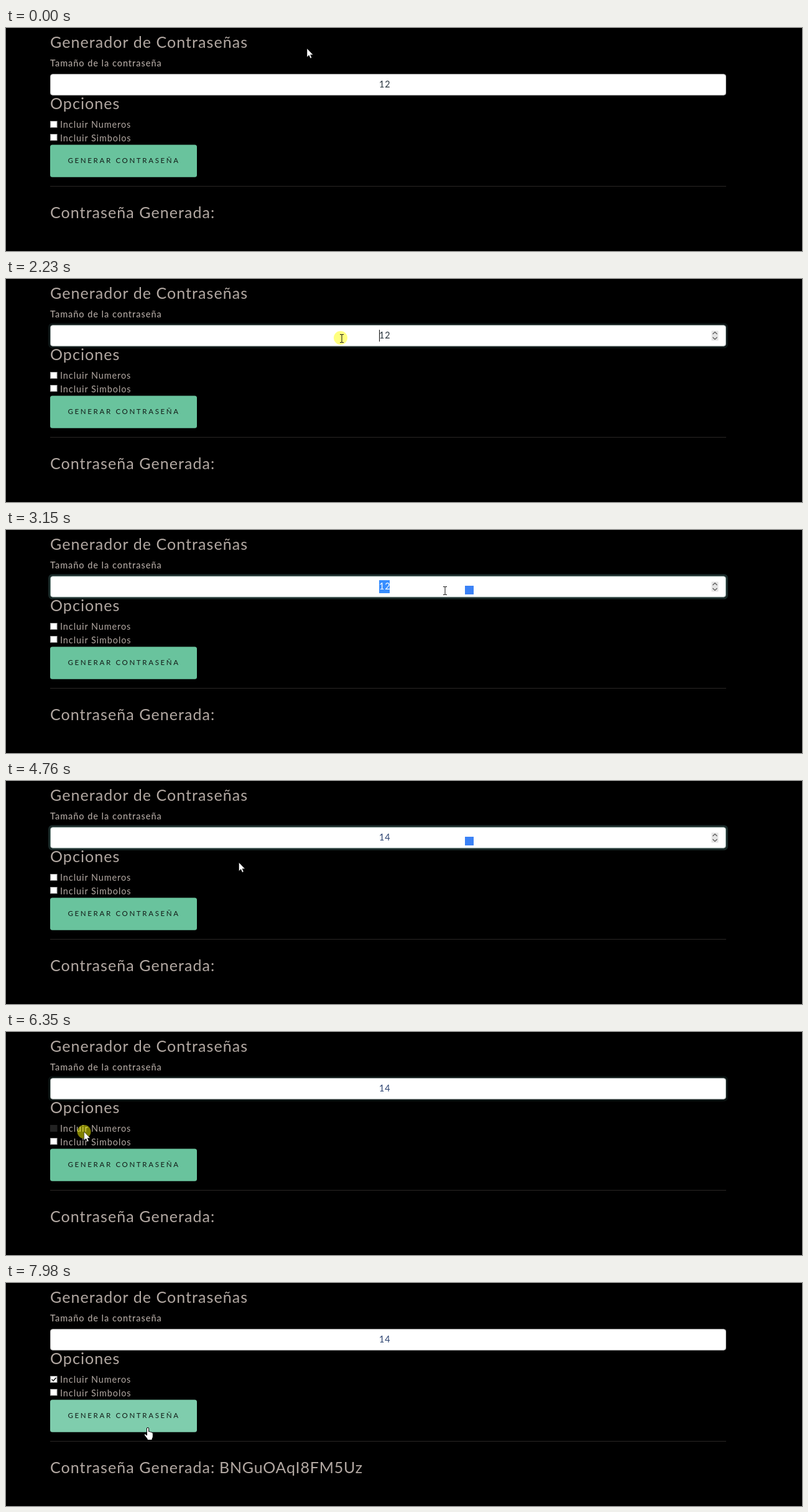
These frames come from a looping animation (1280 by 360 pixels, 8000 ms). An HTML page:

```html
<!DOCTYPE html>
<html lang="es">
<head>
<meta charset="utf-8">
<title>Generador de Contraseñas</title>
<style>
  html, body { margin: 0; width: 100%; height: 100%; overflow: hidden; background: #000; }
  svg { display: block; }
  text { font: 14.4px Lato, "Open Sans", sans-serif; letter-spacing: .95px; fill: #b2a8a2; white-space: pre; }
  .head { font-size: 25px; letter-spacing: 1.07px; }
  .label { font-weight: 500; letter-spacing: 1.02px; }
  .btn { font-size: 11.5px; letter-spacing: 2.66px; fill: #111a16; }
  .box { fill: #fff; stroke: #a0a0a0; }
</style>
</head>
<body>
<svg width="1280" height="360" viewBox="0 0 1280 360">
  <text class="head" x="71" y="32">Generador de Contraseñas</text>
  <text class="label" x="71" y="62">Tamaño de la contraseña</text>

  <rect id="ring" x="69.5" y="72.7" width="1090" height="37.6" rx="5" fill="none" stroke="#1a2a29" stroke-width="3"/>
  <rect id="field" x="71.5" y="74.7" width="1086" height="33.6" rx="3.5" fill="#fff"/>
  <rect id="selection" y="81" x="600" height="21" fill="#388eff"/>
  <text id="value" y="96"></text>
  <rect id="caret" y="82" width="1" height="19" fill="#111"/>
  <g id="spinner" fill="none" stroke="#555" stroke-width="1.2">
    <rect x="1134.5" y="83.5" width="11" height="16" fill="#e4e4e4" stroke="none"/>
    <path d="M1136.5 89l3.5-3.5 3.5 3.5M1136.5 94l3.5 3.5 3.5-3.5"/>
  </g>
  <rect id="badge" x="738" y="90" width="14" height="14" fill="#3b82f6"/>

  <text class="head" x="71" y="131">Opciones</text>
  <rect id="box" class="box" x="71.5" y="150.5" width="10.5" height="10"/>
  <path id="tick" d="M73.5 155.5l2.5 2.5 4.5-5" fill="none" stroke="#111" stroke-width="1.5"/>
  <text x="87" y="161">Incluir Numeros</text>
  <rect class="box" x="71.5" y="171.5" width="10.5" height="10"/>
  <text x="87" y="182.5">Incluir Simbolos</text>

  <rect id="button" x="71" y="188.5" width="236" height="52.3" rx="3.6"/>
  <text class="btn" x="99.5" y="218">GENERAR CONTRASEÑA</text>
  <rect x="71" y="255" width="1087" height="1" fill="#2a2725"/>
  <text class="head" x="71" y="307">Contraseña Generada:</text>
  <text id="password" class="head" x="343" y="307" style="letter-spacing:.8px">BNGuOAqI8FM5Uz</text>

  <g id="pointer">
    <circle id="halo" r="11" fill="#ff0" fill-opacity=".5"/>
    <path id="arrow" d="M0 0V14L3.2 11 5.4 16 7.6 15 5.5 10.2H9.8Z" fill="#fff" stroke="#000" stroke-width=".5"/>
    <path id="beam" d="M-1-5.5H1.2Q2-5.5 2-4.5Q2-5.5 2.8-5.5H5M2-4.5V6.5M-1 7.5H1.2Q2 7.5 2 6.5Q2 7.5 2.8 7.5H5" fill="none" stroke="#111"/>
    <path id="hand" d="M-1.6 1Q-1.6-.6 0-.6T1.6 1V6Q3.6 5 4.4 6.8Q6 6 6.6 7.6Q8.3 7.2 8.3 9V13.5Q8.3 16 7 17.5V19.5H-.8V17.8L-5.4 11.8Q-6.2 9.8-4.4 9.8Q-3.2 9.8-1.6 12Z" fill="#fff" stroke="#000"/>
  </g>
</svg>
<script>
const LOOP = 8000;
const $ = Object.fromEntries([...document.querySelectorAll("[id]")].map(el => [el.id, el]));
const set = (el, attrs) => { for (const k in attrs) el.setAttribute(k, attrs[k]); };
const show = (el, on) => el.style.display = on ? "" : "none";
const ramp = (t, start, len) => Math.min(1, Math.max(0, (t - start) / len));
const mix = (a, b, k) => a + (b - a) * k;
const rgb = (a, b, k) => `rgb(${a.map((v, i) => Math.round(mix(v, b[i], k)))})`;
const within = (t, ...spans) => spans.some(([a, b]) => t >= a && t < b);

// Pointer hotspot: time, x, y
const path = [
  [0, 484, 33], [600, 484, 33], [950, 472, 84], [1150, 463, 109], [1430, 468, 107],
  [1900, 538, 95], [2250, 538, 95], [2930, 704, 97], [4440, 704, 97],
  [4760, 374.5, 131.5], [5230, 150, 156], [5610, 125.5, 161], [6660, 125.5, 161],
  [7330, 143, 217], [7430, 144, 218], [7660, 144, 218], [7980, 228, 234], [LOOP, 228, 234]
];

function pointerAt(t) {
  const i = path.findIndex(p => p[0] > t);
  const [t0, x0, y0] = path[i - 1], [t1, x1, y1] = path[i];
  const u = (t - t0) / (t1 - t0), k = u * u * (3 - 2 * u);
  return [mix(x0, x1, k), mix(y0, y1, k)];
}

function draw(t) {
  const [x, y] = pointerAt(t);
  const overField = y > 74 && y < 108;
  const overButton = y > 188;
  const focused = within(t, [2150, 6270]);

  // Number field
  const glow = ramp(t, 2150, 150) - ramp(t, 6270, 150);
  $.ring.style.opacity = glow;
  set($.field, { stroke: rgb([190, 190, 190], [125, 150, 145], glow) });
  show($.spinner, overField || focused);
  show($.badge, within(t, [3150, 6270]));

  const chosen = within(t, [2250, 3540]) ? (x > 613 ? 2 : x > 604 ? 1 : 0) : 0;
  const typed = t < 3540 ? "12" : t < 3980 ? "1" : "14";
  set($.selection, { width: chosen * 8.5 });
  $.value.textContent = typed;
  set($.value, { x: typed.length > 1 ? 600 : 604 });
  $.value.style.fill = chosen ? "#fff" : t < 3540 ? "#26333c" : "#2b4270";
  show($.caret, !chosen && within(t, [2150, 4610], [5110, 5610], [6110, 6270]));
  set($.caret, { x: t < 3540 ? 600 : t < 3980 ? 613 : 617 });

  // Checkbox, button and result
  const pressed = within(t, [6290, 6430]);
  $.box.style.fill = $.box.style.stroke = pressed ? "#222" : "";
  show($.tick, t >= 6430);
  const hover = ramp(t, 6995, 150);
  set($.button, { fill: rgb([105, 195, 157], [127, 205, 173], hover) });
  show($.password, t >= 7640);

  // Pointer
  set($.pointer, { transform: `translate(${x} ${y})` });
  show($.halo, within(t, [2150, 3080], [6270, 6510], [7500, 7680]));
  show($.beam, overField);
  show($.hand, overButton);
  show($.arrow, !overField && !overButton);
}

function tick(now) {
  draw(now % LOOP);
  requestAnimationFrame(tick);
}
draw(0);
requestAnimationFrame(tick);
</script>
</body>
</html>
```
